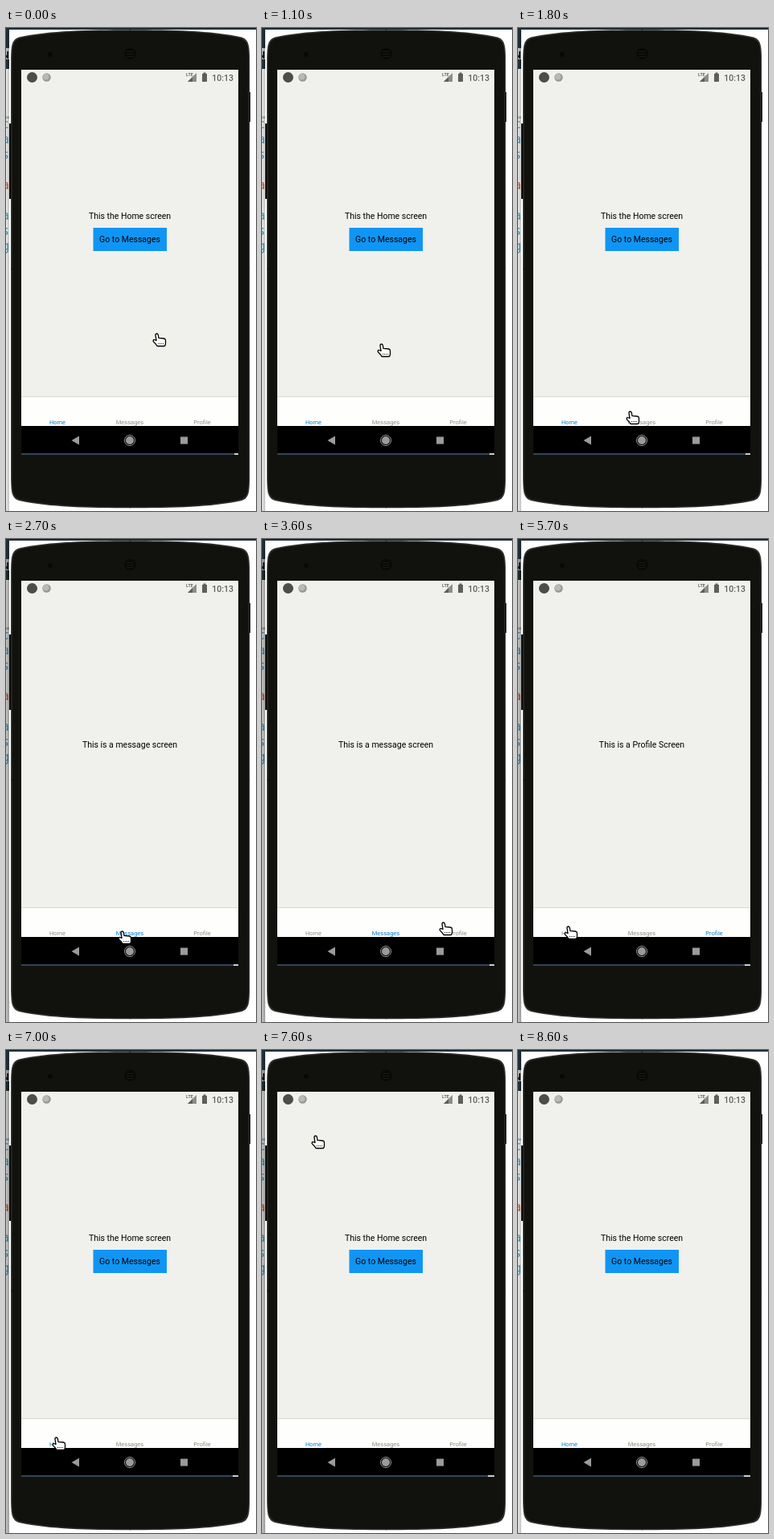
Write an HTML page with a canvas that moves like this. It is 311 by 602 pixels and loops after 8700 ms.

```html
<!DOCTYPE html>
<html lang="en">
<head>
<meta charset="utf-8">
<title>Tab navigation</title>
<style>
  html, body { margin: 0; width: 100%; height: 100%; overflow: hidden; background: #fff; }
  canvas { display: block; width: 311px; height: 602px; }
</style>
</head>
<body>
<canvas id="stage" width="311" height="602"></canvas>
<script>
const ctx = document.getElementById('stage').getContext('2d');
const LOOP = 8700, STEP = 100;
const FONT = 'Roboto, "Open Sans", sans-serif';
const SCREEN = { x: 19, y: 52, w: 270, h: 480 };
const MID = SCREEN.x + SCREEN.w / 2;

const TABS = ['Home', 'Messages', 'Profile'];
const TITLES = ['This the Home screen', 'This is a message screen', 'This is a Profile Screen'];

// Pointer gestures: each eases to a point, optionally bent towards a via point
const START = { x: 182, y: 380 };
const MOVES = [
  { from: 600, to: 900, x: 160, y: 381 },
  { from: 1000, to: 2100, x: 139, y: 488, via: { x: 104, y: 410 } },
  { from: 3200, to: 3900, x: 238, y: 485, via: { x: 190, y: 459 } },
  { from: 4800, to: 5000, x: 72, y: 479 },
  { from: 5100, to: 5700, x: 57, y: 482, via: { x: 58, y: 475 } },
  { from: 7100, to: 7200, x: 61, y: 157 },
  { from: 7200, to: 7600, x: 61, y: 106 },
  { from: 7600, to: 7900, x: 40, y: 10, via: { x: 72, y: 60 } }
];

const lerp = (a, b, p) => a + (b - a) * p;
const easeOut = p => 1 - (1 - p) ** 2;

function rect(x, y, w, h, color) {
  ctx.fillStyle = color;
  ctx.fillRect(x, y, w, h);
}

function disc(x, y, r, color) {
  ctx.fillStyle = color;
  ctx.beginPath();
  ctx.arc(x, y, r, 0, Math.PI * 2);
  ctx.fill();
}

function shape(d, fill, stroke, width = 1) {
  const p = new Path2D(d);
  if (fill) { ctx.fillStyle = fill; ctx.fill(p); }
  if (stroke) { ctx.strokeStyle = stroke; ctx.lineWidth = width; ctx.stroke(p); }
}

function text(str, x, y, size, color, weight = 400, align = 'center') {
  ctx.font = `${weight} ${size}px ${FONT}`;
  ctx.textAlign = align;
  ctx.fillStyle = color;
  ctx.fillText(str, x, y);
}

function drawEditor(focused) {
  rect(0, 0, 311, 602, '#fff');
  rect(0, 0, 311, 2, '#1d2e37');
  ctx.save();
  ctx.beginPath();
  ctx.rect(0, 0, 4, 602);
  ctx.clip();
  rect(0, 0, 4, 602, '#f4f5f3');
  rect(0, 0, 4, 25, '#1d2e37');
  rect(0, 25, 4, 14, '#c9cbca');
  text('N', 4, 38, 13, '#111', 700, 'right');
  rect(0, 39, 4, 12, '#26343b');
  rect(0, 110, 4, 3, '#b9bdbe');
  ctx.font = '16px "Noto Sans Mono", monospace';
  [...'cas a asg'].forEach((ch, i) => {
    ctx.fillStyle = i === 4 ? '#c8552f' : '#3f9cc4';
    ctx.fillText(ch, 4, 125 + i * 19);
  });
  const shade = ctx.createLinearGradient(0, 0, 4, 0);
  shade.addColorStop(0, `rgba(0,0,0,${focused ? 0.2 : 0.05})`);
  shade.addColorStop(1, `rgba(0,0,0,${focused ? 0.36 : 0.2})`);
  rect(0, 25, 4, 577, shade);
  ctx.restore();
}

// One corner of the shell, mirrored into four
function drawShell(w, h, color) {
  for (const sx of [-1, 1]) {
    for (const sy of [-1, 1]) {
      ctx.save();
      ctx.translate(154.6, 300.3);
      ctx.scale(sx, sy);
      shape(`M-1 -1H${w}V${h - 42}C${w} ${h - 18} ${w - 1} ${h - 12} ${w - 11} ${h - 9}` +
        `C${w - 49} ${h - 1} ${w - 94} ${h} -1 ${h}Z`, color);
      ctx.restore();
    }
  }
}

function drawPhone() {
  rect(4, 119, 4, 94, '#0c0d0b');
  rect(300, 80, 4, 37, '#0c0d0b');
  drawShell(148.5, 298, '#2b2c29');
  drawShell(147, 296.5, '#11120e');
  disc(55, 33, 3, '#080907');
  disc(154.5, 32, 7, '#080907');
  for (let y = 29; y < 37; y += 3) rect(150, y, 9, 1, '#1a1b18');
}

function drawStatus() {
  disc(32.5, 61.5, 6.5, '#4c4d4a');
  disc(50.5, 61.5, 5.2, '#969794');
  disc(49.8, 60.8, 3.8, '#b9bab7');
  text('LTE', 224, 60, 5.5, '#50514f', 500, 'left');
  shape('M237 56V67H226Z', '#8c8d8a');
  shape('M232 61V67H226Z', '#5d5e5b');
  rect(245.5, 55.5, 3, 2, '#5d5e5b');
  rect(244, 57, 6, 10, '#5d5e5b');
  text('10:13', 283, 65.5, 10.5, '#5d5e5b', 500, 'right');
}

function drawNav() {
  const grey = '#9b9b9b';
  rect(SCREEN.x, 496, SCREEN.w, 36, '#000');
  shape('M81.5 514L91 508.5V519.5Z', grey);
  disc(MID, 514, 5, grey);
  ctx.strokeStyle = grey;
  ctx.lineWidth = 1;
  ctx.beginPath();
  ctx.arc(MID, 514, 6.5, 0, Math.PI * 2);
  ctx.stroke();
  rect(217, 509.5, 9, 9, grey);
}

function drawScreen(tab, t) {
  const { x, y, w, h } = SCREEN;
  rect(x, y, w, h, '#f0f1ed');
  drawStatus();

  text(TITLES[tab], MID, tab ? 260 : 238, 10.5, '#000');
  if (tab === 0) {
    rect(108.5, 249, 91.5, 29, '#1095f5');
    text('Go to Messages', MID, 267.3, 10.5, '#000');
  }

  rect(x, 459, w, 1, '#d6d7d4');
  rect(x, 460, w, 36, '#fefffc');
  TABS.forEach((label, i) =>
    text(label, x + w * (i + 0.5) / 3, 494, 7.5, i === tab ? '#0a7ac8' : '#8b8c8a'));

  drawNav();

  // Thin progress strip that shrinks slowly
  const end = 284 - Math.floor((t + 3100) / 3500);
  rect(x, 530, w, 2, '#34445a');
  rect(end, 530, x + w - end, 2, '#c9cdd1');
}

function pointerAt(t) {
  let at = START;
  for (const m of MOVES) {
    if (t <= m.from) break;
    const p = easeOut(Math.min(1, (t - m.from) / (m.to - m.from)));
    const via = m.via || { x: (at.x + m.x) / 2, y: (at.y + m.y) / 2 };
    const bend = k => lerp(lerp(at[k], via[k], p), lerp(via[k], m[k], p), p);
    at = { x: bend('x'), y: bend('y') };
  }
  return at;
}

function drawPointer({ x, y }) {
  ctx.save();
  ctx.translate(Math.round(x), Math.round(y));
  ctx.lineJoin = 'round';
  shape('M5 9.5L4 2.8Q4 1 5.5 1Q7 1 7.4 2.8L8 6.3L14.5 7Q16.5 7.4 16.5 9.5V13.5' +
    'Q16.3 16.5 14.5 16.5H7Q5.5 16.5 4.6 14.2L1.2 10.6Q.8 8.4 2.8 8.5Z', '#fff', '#000', 1.3);
  for (let i = 0; i < 4; i++) rect(7 + i * 2, 13, 1, 1, '#222');
  ctx.restore();
}

function render(now) {
  const t = Math.floor((now % LOOP) / STEP) * STEP;
  const tab = t < 2700 || t >= 6200 ? 0 : t < 4400 ? 1 : 2;
  drawEditor(t >= 2000 && t < 8600);
  drawPhone();
  drawScreen(tab, t);
  if (t < 8000) drawPointer(pointerAt(t));
}

const start = performance.now();
function tick() {
  render(performance.now() - start);
  requestAnimationFrame(tick);
}
tick();
</script>
</body>
</html>
```
